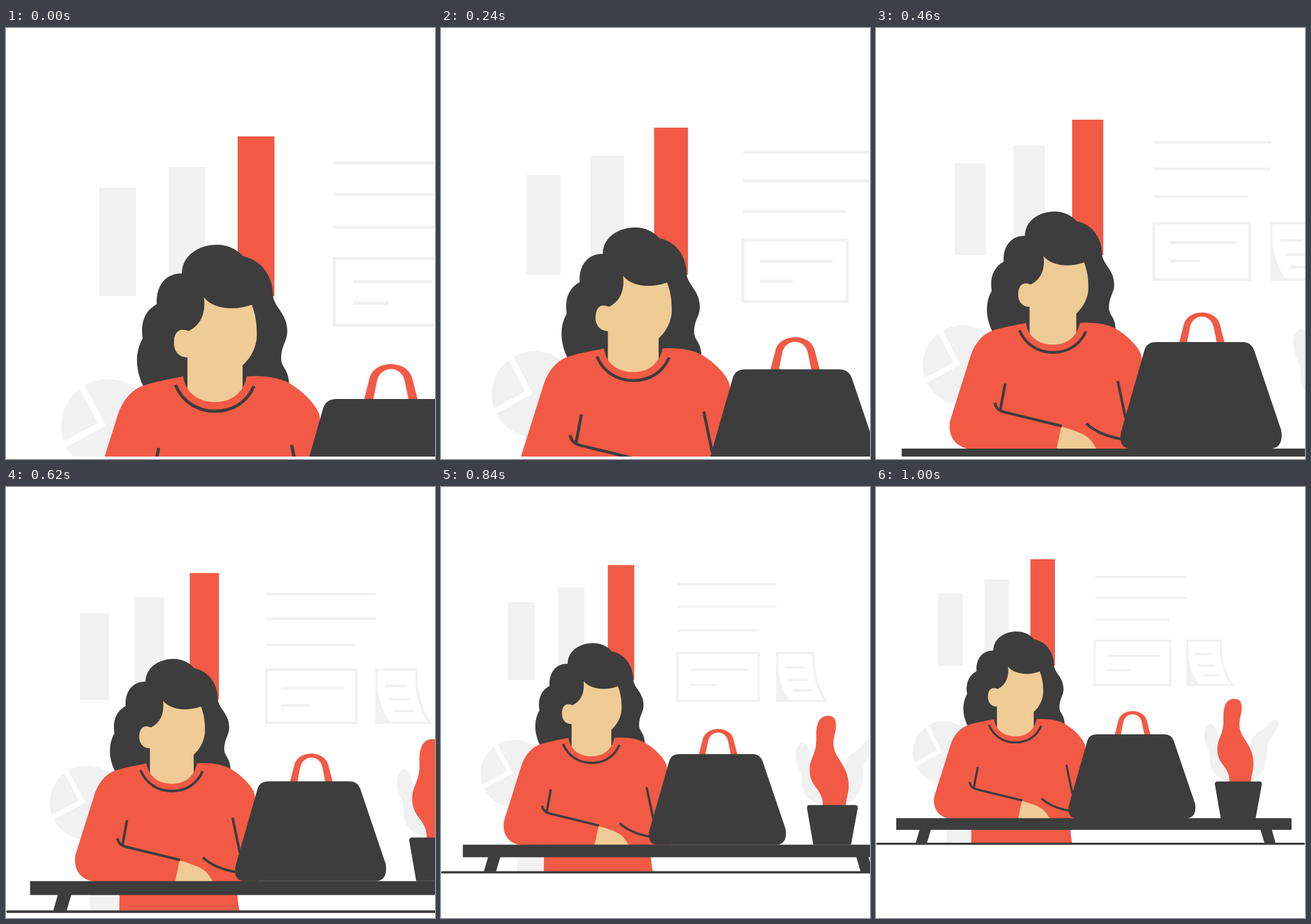
These frames come from a looping animation (700 by 704 pixels, 1600 ms). An HTML page:

```html
<!DOCTYPE html>
<html lang="en">
<head>
<meta charset="utf-8">
<title>Woman at a desk</title>
<style>
  html, body { margin: 0; width: 100%; height: 100%; overflow: hidden; background: #fff; }
  svg { display: block; }
  .red { fill: #f25a45; }
  .dark { fill: #3d3d3d; }
  .skin { fill: #efcb95; }
  .pale { fill: #f1f1f1; }
  .line { fill: none; stroke: #f1f1f1; stroke-width: 3.5; }
  .seam { fill: none; stroke: #3d3d3d; stroke-width: 5.2; }
</style>
</head>
<body>
<svg width="700" height="700">
  <g id="scene">
    <!-- bar chart -->
    <path class="pale" d="M101.3 174h40v118h-40zM176.7 151.3h40V292h-40z"/>
    <path class="red" d="M252 118h40v174h-40z"/>

    <!-- notes on the wall -->
    <path class="line" d="M357.3 147H507M357.3 181H507M357.3 217H478.4M357 251H480.2V323.5H357zM377.3 276H463.3M377.3 299.6H416"/>
    <path class="line" d="M508 251H562.5Q562 297 581 323.5H508zM520 273H548M525 291.5H553.5M532 307.5H561"/>
    <path class="pale" d="M508 251Q508 300 527.5 323.5H508z"/>

    <!-- pie chart -->
    <circle class="pale" cx="111" cy="433.5" r="51"/>
    <path d="M78 381.5 104 431.5 54 459" fill="none" stroke="#fff" stroke-width="6.8"/>

    <path class="pale" d="M115 550h45v32h-45z"/>

    <!-- woman -->
    <g transform="scale(.66667)">
      <path class="dark" d="M287 401C287 372 314 354 345 354C362 354 378 362 387 373C420 380 436 408 436 440C440 458 459 468 459 495C459 512 449 518 449 540C449 555 461 556 462 582L440 620H240L224 585C210 556 211 528 223 507C219 482 226 462 246 451C244 420 262 400 287 401z"/>
      <path class="skin" d="M323 440C338 460 375 462 401 452C408 470 410 488 409 508C406 529 395 543 386 551V620H296V538C282 538 274 528 274 514C274 498 282 488 298 495C318 485 326 466 323 440z"/>
      <path class="red" d="M234 800H474Q475 848 480 872H233z"/>
      <path class="red" d="M224 584C245 577 270 573 289 569C293 597 315 611 341 611C367 611 387 597 393 569C422 567 444 571 462 580C492 598 512 624 512 636L520 812H180C148 808 138 780 143 757L183 630C191 608 205 591 224 584z"/>
      <path class="skin" d="M357 769C385 777 403 784 412 793Q418 800 425 812H348z"/>
      <path class="seam" d="M276.500 583C288 611 313 626 341 626C369 626 393 612 404.500 585M249 686 239.500 737M229 723C231 734 238 739 247 741L358 768M466 681 481 753M405 763C425 781 450 790 480 794"/>
      <path class="red" d="M584 608 593 573C600 541 656 541 663 573L672 608H657L651 578C646 550 610 550 605 578L599 608z"/>
    </g>

    <!-- bag -->
    <path class="dark" d="M345 414Q348 404 360 404H471Q482 404 486 415L520.500 517C523 530 519 541 507 541H327C316 541 312 532 315 519z"/>

    <!-- plant -->
    <path class="pale" d="M575 481C548 472 544 458 545.500 442C544 428 536 422 536 405C537 384 552 381 556 400C558 420 565 430 572 445L580 481z"/>
    <path class="pale" d="M605 481 610 425C612 398 630 404 640 387C645 379 657 377 656 388C654 404 637 412 638 428C638 452 630 478 606 481z"/>
    <path class="red" d="M577 482C577 455 557 455 557 428C557 410 567 405 567 382C567 372 565 346 585 346C601 346 597 366 594 378C587 410 616 415 616 452C616 463 612 472 611.500 482z"/>
    <path class="dark" d="M557 481H626Q630 481 629.500 486L619.500 541H562.500L553 486Q552.500 481 557 481z"/>

    <!-- table and floor -->
    <path class="dark" d="M33 541H678V560H33zM71 560H89.500L83 582H64.700zM627.500 560H646L652 582H634z"/>
    <path d="M2 582.800H698" stroke="#3d3d3d" stroke-width="3.6" stroke-linecap="round"/>
  </g>
</svg>
<script>
  const LOOP = 1600, ZOOM = 1000, STEP = 20;
  const scene = document.getElementById("scene");
  const start = performance.now();

  function draw() {
    const time = (performance.now() - start) % LOOP;
    const progress = Math.min(1, Math.floor(time / STEP) * STEP / ZOOM);
    scene.setAttribute("transform", `scale(${1.5 - progress / 2})`);
    requestAnimationFrame(draw);
  }
  draw();
</script>
</body>
</html>
```
